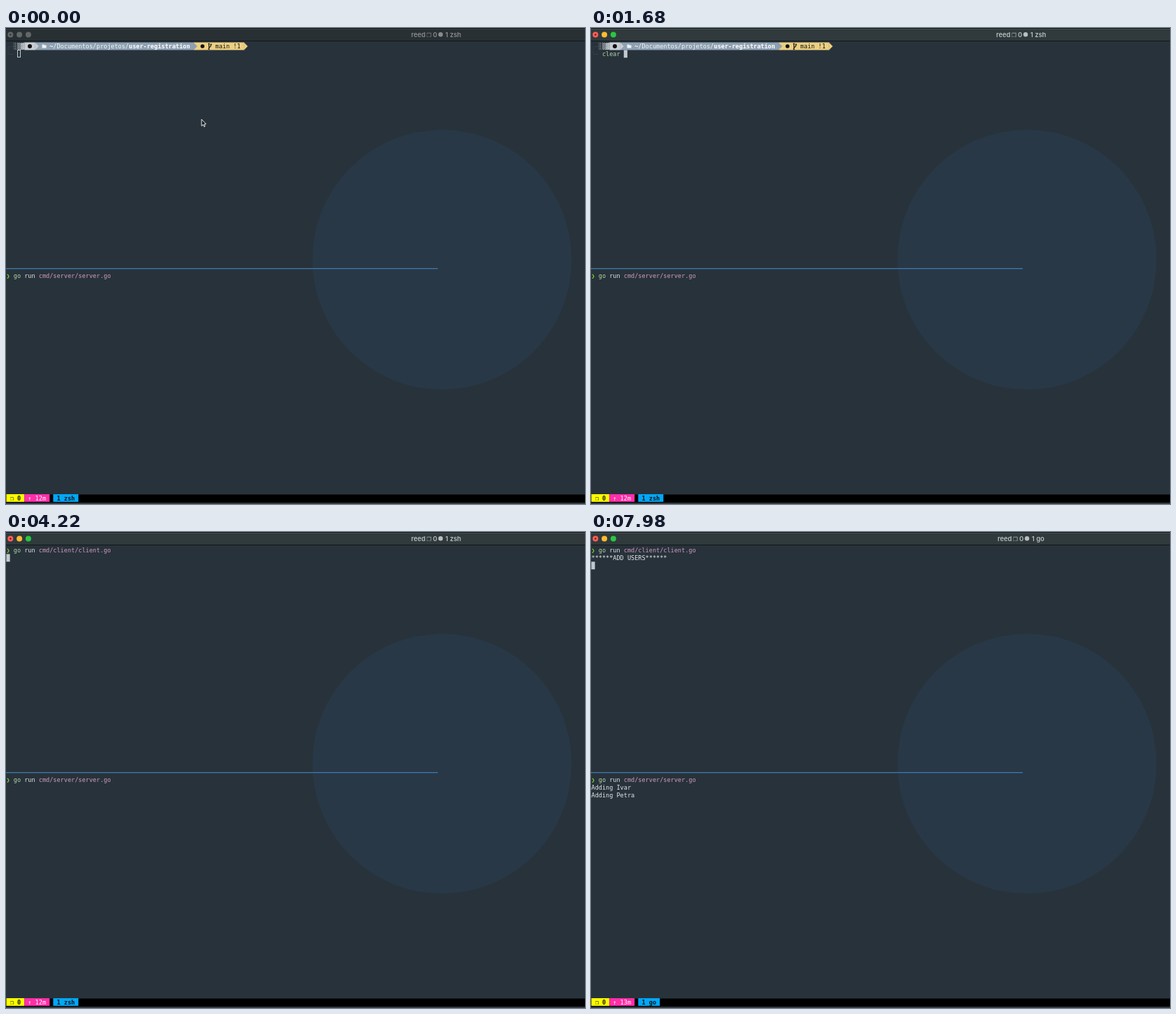
Recreate the animation shown at these times as an HTML page with a canvas. Size 826 px wide and 678 px high, loop 8 s.

```html
<!DOCTYPE html>
<html lang="en">
<head>
<meta charset="utf-8">
<title>Terminal session</title>
<style>
  html, body { margin: 0; width: 100%; height: 100%; overflow: hidden; background: #28323b; }
  canvas { display: block; }
</style>
</head>
<body>
<canvas id="stage" width="826" height="678"></canvas>
<script>
const ctx = document.getElementById('stage').getContext('2d');
const LOOP = 8000, CELL = 5.14, LINE = 10.907;
const MONO = '"DejaVu Sans Mono", monospace';
const GREEN = '#b3d6a5', PINK = '#cf9dbf', WHITE = '#e3e7e9';
const SLATE = '#8ea1b2', SILVER = '#c8ced3', GOLD = '#ebcf82';

const colX = c => 0.5 + c * CELL;
const rowY = r => 20.5 + r * LINE;

function rect(x, y, w, h, color) {
  ctx.fillStyle = color;
  ctx.fillRect(x, y, w, h);
}

function disc(x, y, r, color) {
  ctx.fillStyle = color;
  ctx.beginPath();
  ctx.arc(x, y, r, 0, 7);
  ctx.fill();
}

function poly(points, fill, stroke) {
  ctx.beginPath();
  points.forEach(([x, y]) => ctx.lineTo(x, y));
  ctx.closePath();
  ctx.fillStyle = fill;
  ctx.fill();
  if (stroke) {
    ctx.strokeStyle = stroke;
    ctx.lineWidth = 1;
    ctx.stroke();
  }
}

// Text on the terminal grid; returns the column after it.
function put(text, col, row, color, weight = 400) {
  ctx.font = `${weight} 8.54px ${MONO}`;
  ctx.fillStyle = color;
  for (const ch of text) ctx.fillText(ch, colX(col++), rowY(row) + 8.6);
  return col;
}

function block(from, to, row, color) {
  rect(colX(from), rowY(row), (to - from) * CELL, 10.9, color);
}

function arrowTip(col, color) {
  const x = colX(col), y = rowY(0);
  poly([[x - 0.3, y], [x + CELL, y + 5.45], [x - 0.3, y + 10.9]], color);
}

function command(text, col, row) {
  const [name, verb, path] = text.split(' ');
  col = put(name, col, row, GREEN);
  if (verb) col = put(verb, col + 1, row, WHITE);
  if (path) col = put(path, col + 1, row, PINK);
  return col;
}

function sent(text, row) {
  put('❯', 0, row, '#7fe02a', 700);
  command(text, 2, row);
}

function cursor(col, row, solid) {
  const x = colX(col), y = rowY(row);
  if (solid) return rect(x, y, CELL, 10.9, '#c2cad0');
  ctx.strokeStyle = '#c2cad0';
  ctx.lineWidth = 1;
  ctx.strokeRect(Math.round(x) + 0.5, Math.round(y) + 0.5, 4, 10);
}

function prompt() {
  put('╭─', 0, 0, '#39434b');
  put('╰─', 0, 1, '#39434b');
  put('░▒▓', 2, 0, SILVER);
  block(5, 8, 0, SILVER);
  block(8, 52, 0, SLATE);
  block(52, 66, 0, GOLD);
  arrowTip(8, SILVER);
  arrowTip(52, SLATE);
  arrowTip(66, GOLD);
  disc(34, 26, 3, '#111');
  poly([[51.5, 23.5], [54, 23.5], [55, 24.5], [57.5, 24.5], [57.5, 28.5], [51.5, 28.5]], '#eef2f4');
  const end = put('~', 12, 0, '#fff', 700);
  put('user-registration', put('/Documentos/projetos/', end, 0, '#f2f5f6'), 0, '#fff', 700);
  disc(280.3, 26, 2.8, '#111');
  branch(289.5, 22.5);
  put('main !1', 58, 0, '#151515');
}

function branch(x, y) {
  ctx.strokeStyle = '#151515';
  ctx.lineWidth = 1.1;
  ctx.beginPath();
  ctx.moveTo(x, y);
  ctx.lineTo(x, y + 7.5);
  ctx.moveTo(x, y + 5.5);
  ctx.quadraticCurveTo(x + 3, y + 4.5, x + 3, y + 1);
  ctx.stroke();
  for (const [dx, dy] of [[0, 0], [0, 7.5], [3, 1]]) disc(x + dx, y + dy, 1.1, '#151515');
}

function titleBar(active, job) {
  rect(0, 0, 826, 19, '#11171a');
  rect(0, 1, 826, 17, active ? '#303a3c' : '#293033');
  rect(0, 1, 826, 1, active ? '#465052' : '#394143');
  const lights = active ? ['#ff5f57', '#febc2e', '#28c840'] : Array(3).fill('#626768');
  lights.forEach((color, i) => disc(6.3 + i * 12.8, 9.5, 4, color));
  disc(6.3, 9.5, 1.3, active ? '#7d1510' : '#303638');

  const color = active ? '#b9bfc0' : '#878d8f';
  const x = job === 'go' ? 580 : 578;
  const label = (text, dx, font = '600 9.4px Inter, sans-serif') => {
    ctx.font = font;
    ctx.fillStyle = color;
    ctx.fillText(text, x + dx, 12.7);
  };
  label('reed', 0);
  label('❐', 21.8, '8px "DejaVu Sans", sans-serif');
  label('0', 31);
  disc(x + 42, 9.3, 3.2, color);
  label('1 ' + job, 48.8);
}

function statusBar(minutes, job) {
  const end = 16 + job.length + 1;
  rect(0, 664.5, 826, 11.5, '#000');
  rect(0, 676, 826, 2, '#30383f');
  block(0, 5, 59, '#ff0');
  block(5, 12, 59, '#ff2fa8');
  block(13, end, 59, '#00a8f8');
  put('❐ 0', 1, 59, '#111', 700);
  put(`↑ ${minutes}m`, 6, 59, '#fff');
  put('1 ' + job, 14, 59, '#111', 700);
}

function arrowPointer(x, y) {
  poly([[x, y], [x, y + 9.5], [x + 2.2, y + 7.6], [x + 3.7, y + 10.7],
        [x + 5, y + 10], [x + 3.7, y + 7], [x + 6.4, y + 6.8]], '#14181b', '#e8ecee');
}

function beamPointer(x, y) {
  for (const [color, width] of [['#dfe4e6', 3], ['#1a2126', 1]]) {
    ctx.strokeStyle = color;
    ctx.lineWidth = width;
    ctx.beginPath();
    for (const s of [-1, 1]) {
      ctx.moveTo(x - 2.5, y + s * 5);
      ctx.quadraticCurveTo(x, y + s * 5, x, y + s * 3);
      ctx.quadraticCurveTo(x, y + s * 5, x + 2.5, y + s * 5);
    }
    ctx.moveTo(x, y - 4);
    ctx.lineTo(x, y + 4);
    ctx.stroke();
  }
}

function typed(t) {
  if (t < 1660) return '';
  if (t < 1940) return 'clear';
  if (t < 3060) return 'go run cmd/client/client';
  return 'go run cmd/client/client.go';
}

function draw(t) {
  const active = t >= 700, running = t >= 4220, adding = t >= 5520;
  const job = t >= 4860 ? 'go' : 'zsh';

  rect(0, 0, 826, 678, '#28323b');
  disc(622, 330, 185, '#283847');
  titleBar(active, job);

  if (running) {
    sent('go run cmd/client/client.go', 0);
    if (adding) put('******ADD USERS******', 0, 1, WHITE);
    cursor(0, adding ? 2 : 1, true);
  } else {
    prompt();
    const text = typed(t);
    const end = command(text, 3, 1);
    cursor(text ? end + 1 : end, 1, t >= 740);
  }

  rect(0, 342, 616, 1.3, '#3d79aa');
  sent('go run cmd/server/server.go', 30);
  if (adding) put('Adding Ivar', 0, 31, WHITE);
  if (t >= 7500) put('Adding Petra', 0, 32, WHITE);
  statusBar(t >= 4860 ? 13 : 12, job);

  if (!active) arrowPointer(279, 130);
  else if (t < 1660) beamPointer(279.5, 131);
}

function frame() {
  draw(performance.now() % LOOP);
  requestAnimationFrame(frame);
}
frame();
</script>
</body>
</html>
```
